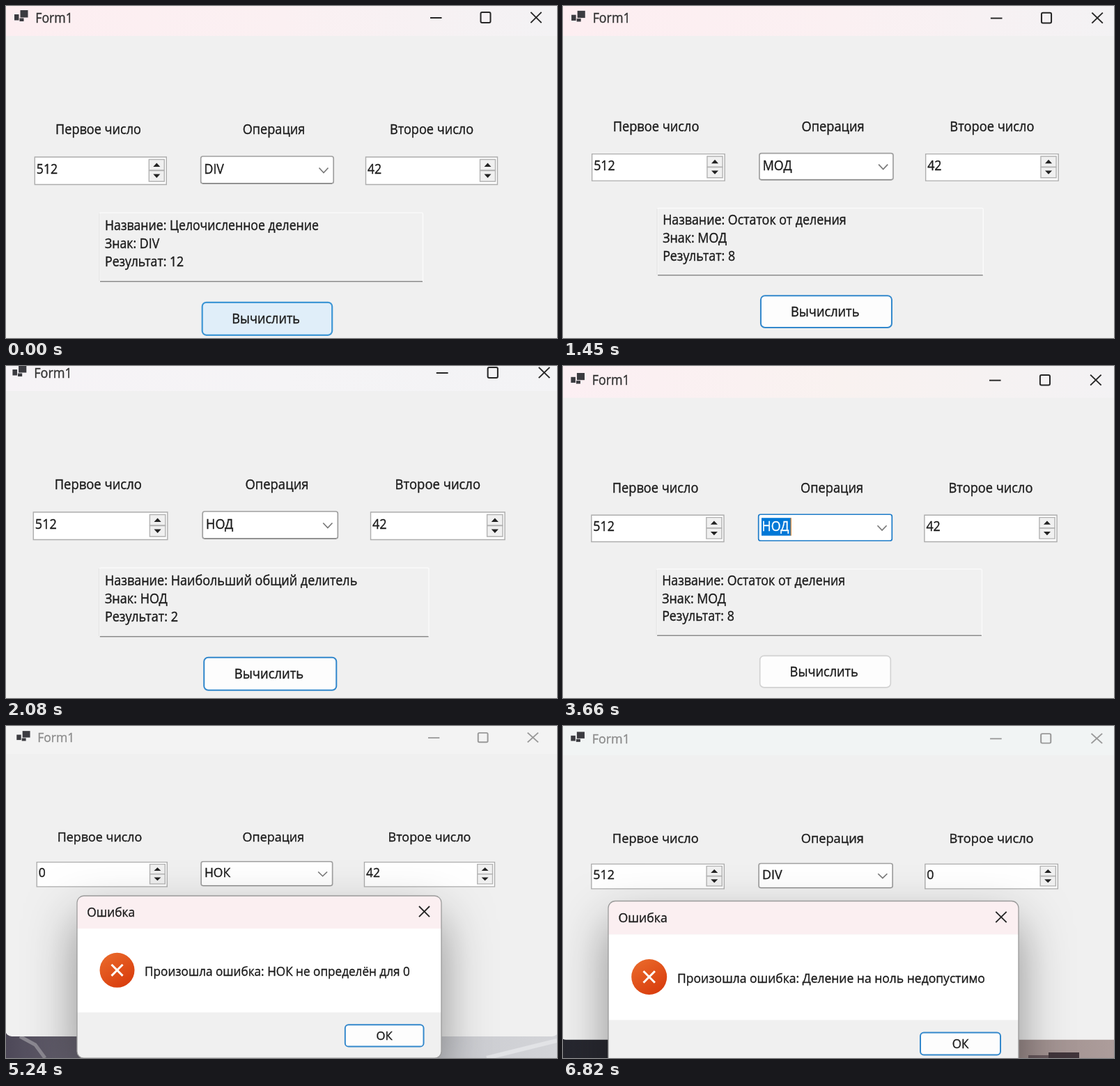
Recreate the animation shown at these times as an HTML page with a canvas. Size 791x477 px, loop 8000 ms.

```html
<!DOCTYPE html>
<html lang="ru">
<head>
<meta charset="utf-8">
<title>Form1</title>
<style>
html, body { margin: 0; width: 100%; height: 100%; overflow: hidden; background: #f0f0f0; }
canvas { display: block; }
</style>
</head>
<body>
<canvas id="stage" width="791" height="477"></canvas>
<script>
const ctx = document.getElementById('stage').getContext('2d');
const LOOP = 8000;
const FONT = '"Open Sans", "Noto Sans", sans-serif';
const PINK = ['#fdeef1', '#fbf0f2', '#f3f2f4'];
const BUTTON = {
  hover: ['#e0eef9', '#3f97d5', 2.2],
  focus: ['#fdfdfd', '#3388cc', 2],
  plain: ['#fdfdfd', '#d2d2d2', 1.6]
};

// view: x scale, y scale, x offset, y offset of the form window
const scenes = [
  { at: 0, view: [1, 1, 0, 0], bar: PINK, a: '512', op: 'DIV', b: '42', button: 'hover',
    result: ['Целочисленное деление', 'DIV', '12'] },
  { at: 500, view: [1.008, .975, 0, 1], bar: PINK, a: '512', op: 'МОД', b: '42', button: 'focus',
    result: ['Остаток от деления', 'МОД', '8'] },
  { at: 2080, view: [1.019, 1, -2.8, -7], bar: ['#f6f3f6', '#f5f4f6', '#f3f3f5'], a: '512', op: 'НОД', b: '42', button: 'focus',
    result: ['Наибольший общий делитель', 'НОД', '2'] },
  { at: 3660, view: [1.006, .968, -.7, 4.2], bar: ['#fceff3', '#f9f2f0', '#f3f2f4'], a: '512', op: 'НОД', b: '42', button: 'plain', selected: true,
    result: ['Остаток от деления', 'МОД', '8'] },
  { at: 5240, view: [.9895, .893, 3.4, 1.8], bar: ['#f3f3f3', '#f3f3f3', '#f3f3f3'], a: '0', op: 'НОК', b: '42', button: 'focus',
    dialog: { x: 102, y: 244, w: 523, h: 238, k: .98, text: 'НОК не определён для 0' },
    desktop: ['#4d4858', '#96939c', '#c6c7cc', '#d3d4d8'] },
  { at: 6820, view: [1.008, .9, -.8, 3], bar: ['#f1f4f4', '#f1f4f4', '#f1f4f4'], a: '512', op: 'DIV', b: '0', button: 'focus',
    dialog: { x: 65, y: 251.5, w: 589, h: 260, k: 1, text: 'Деление на ноль недопустимо' },
    desktop: ['#25262e', '#3a383f', '#8f8080', '#ad9d9b'], block: true }
];

function box(x, y, w, h, r, fill, stroke, width = 1.4) {
  ctx.beginPath();
  ctx.roundRect(x, y, w, h, r);
  if (fill) { ctx.fillStyle = fill; ctx.fill(); }
  if (stroke) { ctx.strokeStyle = stroke; ctx.lineWidth = width; ctx.stroke(); }
}

function line(color, width, ...pts) {
  ctx.beginPath();
  for (let i = 0; i < pts.length; i += 2) ctx.lineTo(pts[i], pts[i + 1]);
  ctx.strokeStyle = color;
  ctx.lineWidth = width;
  ctx.stroke();
}

function cross(x, y, r, color, width) {
  line(color, width, x - r, y - r, x + r, y + r);
  line(color, width, x - r, y + r, x + r, y - r);
}

function gradient(x0, y0, x1, y1, colors) {
  const g = ctx.createLinearGradient(x0, y0, x1, y1);
  colors.forEach((c, i) => g.addColorStop(i / (colors.length - 1), c));
  return g;
}

// A hairline stroke gives the letters the weight of hinted screen text
function text(str, x, y, { color = '#1c1c1c', align = 'left', tall = 1.15, size = 17.7 } = {}) {
  ctx.save();
  ctx.translate(x, y);
  ctx.scale(1, tall);
  ctx.font = `${size}px ${FONT}`;
  ctx.textAlign = align;
  ctx.fillStyle = ctx.strokeStyle = color;
  ctx.lineWidth = .35;
  ctx.fillText(str, 0, 0);
  ctx.strokeText(str, 0, 0);
  ctx.restore();
}

function triangle(x, y, dir) {
  ctx.beginPath();
  ctx.moveTo(x - 5, y + 2.5 * dir);
  ctx.lineTo(x + 5, y + 2.5 * dir);
  ctx.lineTo(x, y - 3 * dir);
  ctx.fillStyle = '#222';
  ctx.fill();
}

function spinner(x, value) {
  box(x, 217, 189, 39.5, 0, '#fff', '#adadad');
  box(x + 164, 220.5, 22, 15.5, 0, '#f0f0f0', '#b3b3b3');
  box(x + 164, 236.5, 22, 15.5, 0, '#f0f0f0', '#b3b3b3');
  triangle(x + 175, 228.5, 1);
  triangle(x + 175, 244, -1);
  text(value, x + 2.5, 241);
}

function combo(value, selected) {
  box(279.7, 216, 190.5, 39, 3, '#fff', selected ? '#1d7cc9' : '#a0a0a0', 1.7);
  if (!selected) line('#868686', 1.3, 282, 255, 468, 255);
  line('#7a7a7a', 1.7, 449.5, 232.5, 456, 239.5, 462.5, 232.5);
  if (selected) {
    box(284, 221, 42, 26.5, 0, '#0078d7');
    line('#e08a35', 1.3, 326, 221, 326, 247.5);
  }
  text(value, 284.5, 241, { color: selected ? '#fff' : '#1c1c1c' });
}

function titleBar(colors, active) {
  const ink = active ? '#262626' : '#999';
  box(-3, -12, 800, 55, 0, gradient(0, 0, 791, 0, colors));
  ctx.fillStyle = '#3b3b40';
  ctx.fillRect(20.5, 6, 11, 10.5);
  ctx.fillRect(12, 12, 6.5, 8.5);
  ctx.fillRect(19.5, 17.5, 6, 4.5);
  text('Form1', 42.3, 24, { color: active ? '#333' : '#8c8c8c' });
  line(ink, 2, 609, 17, 625.5, 17);
  box(681.5, 9, 14, 15, 2, null, ink, 2);
  cross(761, 16.5, 7.7, ink, 1.9);
}

function form(s) {
  box(-4, -12, 802, 509.4, 9, '#f0f0f0');
  titleBar(s.bar, !s.dialog);
  const center = { align: 'center', size: 18.1 };
  text('Первое число', 132.5, 183.5, center);
  text('Операция', 384.5, 183.5, center);
  text('Второе число', 611, 183.5, center);
  spinner(41.3, s.a);
  combo(s.op, s.selected);
  spinner(516.5, s.b);
  if (!s.result) return;

  box(134.5, 297, 464, 99, 2, '#f0f0f0', '#fafafa', 1.5);
  line('#dedede', 1, 134, 298, 134, 395);
  line('#8a8a8a', 1.6, 135, 395.7, 598, 395.7);
  const names = ['Название', 'Знак', 'Результат'];
  s.result.forEach((v, i) => text(`${names[i]}: ${v}`, 142, 321.5 + 26.2 * i));

  const [fill, stroke, width] = BUTTON[s.button];
  box(281.7, 425.8, 186.5, 47, 6, fill, stroke, width);
  text('Вычислить', 373.2, 456, center);
}

function dialog({ x, y, w, h, k, text: message }) {
  ctx.setTransform(k, 0, 0, k, x, y);
  const W = w / k;
  ctx.save();
  ctx.shadowColor = 'rgba(0,0,0,.42)';
  ctx.shadowBlur = 70;
  ctx.shadowOffsetY = 32;
  box(0, 0, W, h, 10, '#f0f0f0');
  ctx.restore();

  box(0, 0, W, 48, [10, 10, 0, 0], '#fbeff1');
  box(0, 48, W, 123, 0, '#fff');
  box(0, 0, W, h, 10, null, '#9b9b9b', 1.3);
  text('Ошибка', 14.5, 30.5, { tall: 1.05 });
  cross(W - 25, 23, 7.7, '#262626', 1.9);

  box(33.2, 83.5, 51, 51, 25.5, gradient(40, 84, 72, 135, ['#ea6a2b', '#d83b0c']));
  cross(58.7, 109, 8.2, '#fff', 3);
  text('Произошла ошибка: ' + message, 99, 117.5, { tall: 1.03, size: 17.5 });

  box(W - 141, 189, 115, 32, 5, '#fdfdfd', '#3388cc', 2);
  text('ОК', W - 83.5, 211.5, { align: 'center', tall: 1.03, size: 17 });
}

function desktop(s) {
  box(0, 430, 791, 47, 0, gradient(0, 0, 791, 0, s.desktop));
  if (s.block) {
    box(697, 469, 44, 8, 0, '#40343a');
    box(668, 473, 29, 4, 0, '#66575b');
  } else {
    line('#8b8891', 5, 20, 446, 42, 458, 56, 477);
    line('#e2e3e6', 6, 690, 477, 791, 452);
  }
}

function draw(now) {
  const t = now % LOOP;
  const s = scenes.findLast(scene => scene.at <= t);
  ctx.setTransform(1, 0, 0, 1, 0, 0);
  ctx.fillStyle = '#f0f0f0';
  ctx.fillRect(0, 0, 791, 477);
  if (s.desktop) desktop(s);
  const [sx, sy, ox, oy] = s.view;
  ctx.setTransform(sx, 0, 0, sy, ox, oy);
  form(s);
  if (s.dialog) dialog(s.dialog);
}

const start = performance.now();
function tick() {
  draw(performance.now() - start);
  requestAnimationFrame(tick);
}
tick();
</script>
</body>
</html>
```
